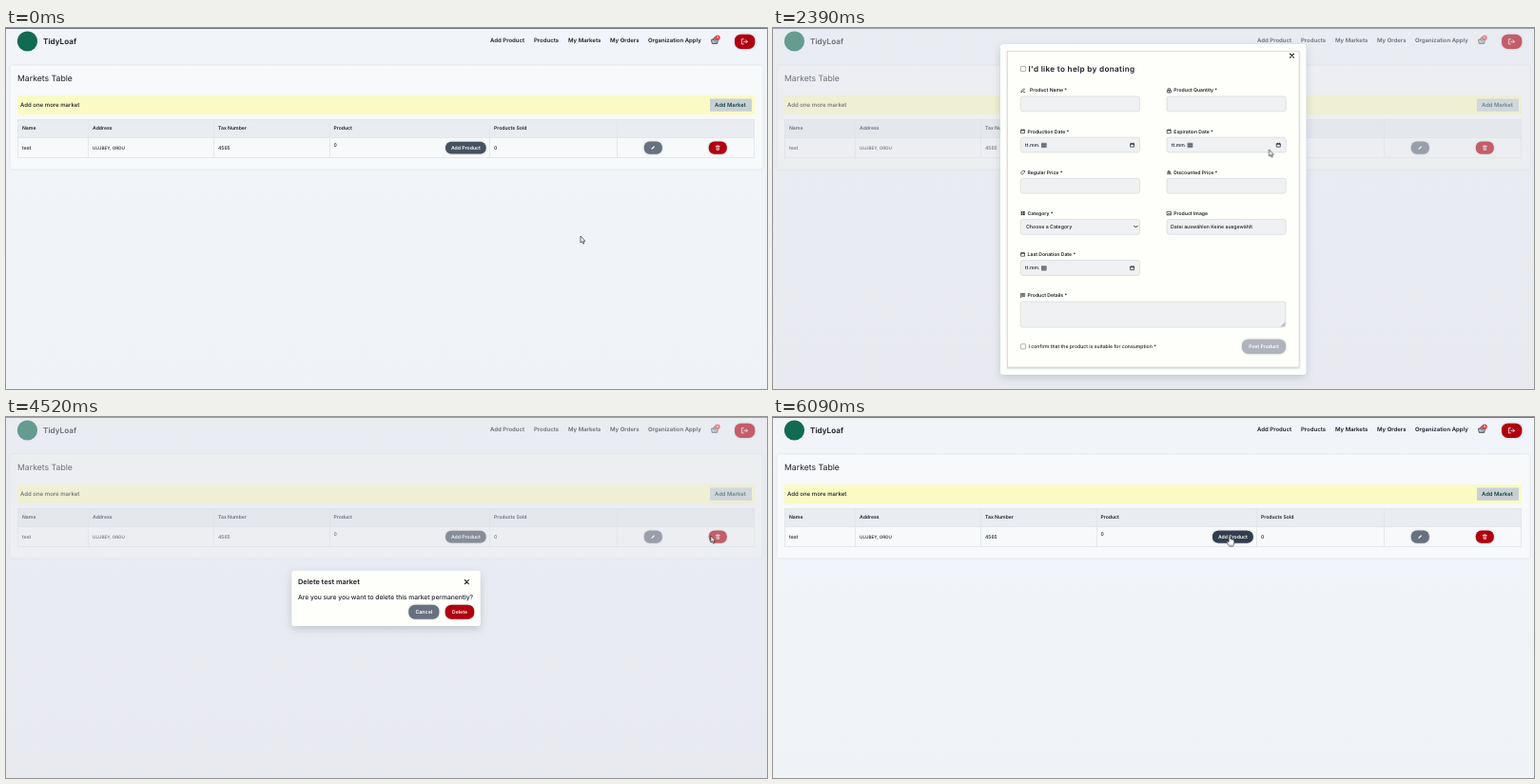
Write an HTML page that moves like this. It is 800 px wide and 380 px high and loops after 6120 ms.

```html
<!DOCTYPE html>
<html lang="en">
<head>
<meta charset="utf-8">
<title>Markets Table</title>
<style>
  html, body { margin: 0; width: 100%; height: 100%; overflow: hidden; background: #f0f3f8; }
  svg { display: block; width: 800px; height: 380px; }
  text { font: 500 5.1px Inter, "Open Sans", sans-serif; fill: #1b1f27; text-rendering: geometricPrecision; white-space: pre; }
  .nav text { font-size: 6px; }
  .bold text, text.bold { font-weight: 600; }
  .white text, text.white { fill: #fff; font-weight: 600; }
  .line { fill: none; stroke-linecap: round; stroke-linejoin: round; }
  .lift { filter: drop-shadow(0 .8px .8px rgba(40, 50, 70, .3)); }
  .panel { transform-box: fill-box; transform-origin: center; }

  #cursor, #arrow, #hand, #addHover, #delHover,
  #formDialog, #formDialog > .panel, #askDialog, #askDialog > .panel {
    animation: 6120ms linear infinite;
  }
  #cursor { animation-name: travel; }
  #arrow, #hand, #addHover, #delHover { animation-timing-function: step-end; }
  #arrow { animation-name: arrow; }
  #hand { animation-name: hand; }
  #addHover { animation-name: addHover; }
  #delHover { animation-name: delHover; }
  #formDialog { animation-name: formFade; }
  #formDialog > .panel { animation-name: formGrow; }
  #askDialog { animation-name: askFade; }
  #askDialog > .panel { animation-name: askShrink; }

  @keyframes travel {
    0%, .49% { transform: translate(604px, 219px); }
    5% { transform: translate(589px, 197px); }
    10.46% { transform: translate(566px, 173px); }
    15.6% { transform: translate(532px, 150px); }
    20.7% { transform: translate(495px, 127px); }
    26.1% { transform: translate(488px, 129px); }
    31.5%, 34.3% { transform: translate(485px, 122px); }
    44.1% { transform: translate(560px, 134px); }
    51.9%, 57.2% { transform: translate(634px, 145px); }
    62.4% { transform: translate(694px, 130px); }
    65.4%, 72.7% { transform: translate(743.5px, 125px); }
    73.86%, 76% { transform: translate(741px, 125px); }
    79.5% { transform: translate(660px, 172px); }
    83.7% { transform: translate(572px, 209px); }
    88.2%, 91.2% { transform: translate(564px, 205px); }
    95.1% { transform: translate(488px, 127px); }
    99.4%, 100% { transform: translate(480px, 124.5px); }
  }
  @keyframes arrow {
    0% { opacity: 1; } 19.8% { opacity: 0; } 33.66% { opacity: 1; }
    64.7% { opacity: 0; } 73.8% { opacity: 1; } 94.6%, 100% { opacity: 0; }
  }
  @keyframes hand {
    0% { opacity: 0; } 19.8% { opacity: 1; } 33.66% { opacity: 0; }
    64.7% { opacity: 1; } 73.8% { opacity: 0; } 94.6%, 100% { opacity: 1; }
  }
  @keyframes addHover {
    0% { opacity: 0; } 19.8% { opacity: 1; } 33.66% { opacity: 0; } 94.6%, 100% { opacity: 1; }
  }
  @keyframes delHover {
    0% { opacity: 0; } 64.7% { opacity: 1; } 73.8%, 100% { opacity: 0; }
  }
  @keyframes formFade {
    0%, 33.66% { opacity: 0; } 37.6%, 55.9% { opacity: 1; } 58.8%, 100% { opacity: 0; }
  }
  @keyframes formGrow {
    0%, 33.66% { transform: scale(.95); } 37.6%, 55.9% { transform: none; } 58.8%, 100% { transform: scale(.95); }
  }
  @keyframes askFade {
    0%, 73.8% { opacity: 0; } 73.85%, 85.3% { opacity: 1; } 88.2%, 100% { opacity: 0; }
  }
  @keyframes askShrink {
    0%, 85.3% { transform: none; } 88.2%, 100% { transform: scale(.95); }
  }
</style>
</head>
<body>
<svg viewBox="0 0 800 380" xmlns="http://www.w3.org/2000/svg">
  <defs>
    <linearGradient id="sky" x2="0" y2="1">
      <stop stop-color="#f1f4f9"/><stop offset="1" stop-color="#eff2f7"/>
    </linearGradient>
    <rect id="backdrop" width="800" height="380" fill="#dee1e7" opacity=".42"/>
    <path id="cross" class="line" d="M-2-2 2 2M2-2-2 2" stroke="#16181d" stroke-width="1.1"/>
    <g id="trash" class="line" stroke="#fff" stroke-width=".55">
      <path d="M-2-1.6H2M-.8-1.6V-2.4H.8V-1.6M-1.5-1.6-1.3 2.4H1.3L1.5-1.6M-.4-.5V1.4M.4-.5V1.4"/>
    </g>
    <g id="i-pen" class="line"><path d="M-1.8 1.8-1.4.5 1-1.9 1.9-1-.5 1.4ZM.6 2H2.2"/></g>
    <g id="i-box" class="line"><path d="M-2 2V0H2V2ZM-1.2 0V-1.9H1.2V0M0 0V2"/></g>
    <g id="i-date" class="line"><path d="M-1.8-1.4H1.8V2H-1.8ZM-1.8-.8H1.8M-1-2V-1.4M1-2V-1.4"/></g>
    <g id="i-tag" class="line"><path d="M-2 .5 .3-1.8 2-1.6 1.8.1-.5 2.2Z"/></g>
    <g id="i-coin" class="line"><path d="M-2 1.8H2M-1.4.6H1.4M0-1.8 1.3-.4H-1.3Z"/></g>
    <g id="i-grid"><path d="M-2-2H-.2V-.2H-2ZM.3-2H2V-.2H.3ZM-2 .3H-.2V2H-2ZM.3.3H2V2H.3Z" fill="#1b1f27" stroke="none"/></g>
    <g id="i-image" class="line"><path d="M-2-1.7H2V1.8H-2ZM-1.7 1.5-.5 0 .3.8 1 .2 1.8 1.4"/></g>
    <g id="i-note" class="line"><path d="M-2-1.8H2V1.2H-.8L-2 2.2ZM-1.1-.8H1.1M-1.1.2H.6"/></g>
  </defs>

  <rect width="800" height="380" fill="url(#sky)"/>
  <rect width="800" height="1" fill="#73767e"/>

  <!-- header -->
  <circle cx="22.5" cy="14" r="10.6" fill="#116b52"/>
  <text class="bold" x="39" y="17.2" style="font-size:8.2px">TidyLoaf</text>
  <g class="nav bold">
    <text x="509" y="15">Add Product</text>
    <text x="555" y="15">Products</text>
    <text x="591" y="15">My Markets</text>
    <text x="635" y="15">My Orders</text>
    <text x="675" y="15">Organization Apply</text>
  </g>
  <path d="M742 12.2H748.4L747.7 16.3H742.7ZM743.3 12 745.2 9.6 747.1 12" class="line" stroke="#2b3038" stroke-width=".9"/>
  <path d="M744 13.4V15.3M745.2 13.4V15.3M746.4 13.4V15.3" class="line" stroke="#2b3038" stroke-width=".5"/>
  <circle cx="748" cy="10.2" r="2.7" fill="#e0404a"/>
  <text class="white" x="748" y="11.4" text-anchor="middle" style="font-size:3.3px">0</text>
  <rect class="lift" x="766" y="6.7" width="21.3" height="15.2" rx="6.5" fill="#b0000f"/>
  <path class="line" d="M775.4 11.7H773.4V16.9H775.4M775.6 14.3H779.4M777.8 12.7 779.4 14.3 777.8 15.9" stroke="#fff" stroke-width=".75"/>

  <!-- markets card -->
  <rect class="lift" x="4.5" y="39.5" width="791" height="109" rx="2" fill="#f7f9fa" style="filter:drop-shadow(0 .6px 1px rgba(60,70,90,.13))"/>
  <text x="12" y="56.2" style="font-size:8.7px;font-weight:400">Markets Table</text>
  <rect x="12" y="71.3" width="775" height="20" rx="1" fill="#fafac4"/>
  <text x="15" y="83" style="font-size:6.05px">Add one more market</text>
  <rect x="740" y="74.5" width="44" height="13.3" fill="#c9d0d5"/>
  <text class="bold" x="745" y="83" style="font-size:5.85px;fill:#14493f">Add Market</text>

  <rect x="12" y="96" width="775" height="19" fill="#e9ecf0"/>
  <path d="M12.5 96V137M86.5 96V137M218.5 96V137M340.5 96V137M508.5 96V137M642.5 96V137M786.5 96V137M12 96.5H787M12 115.5H787M12 136.5H787" stroke="#e3e6ea" fill="none" stroke-width=".9"/>
  <g class="bold">
    <text x="17" y="107.4">Name</text>
    <text x="91" y="107.4">Address</text>
    <text x="223" y="107.4">Tax Number</text>
    <text x="344.5" y="107.4">Product</text>
    <text x="513" y="107.4">Products Sold</text>
  </g>
  <text x="17" y="127.8">test</text>
  <text x="91" y="127.8" style="font-size:4.6px">ULUBEY, ORDU</text>
  <text x="223" y="127.8">4565</text>
  <text x="344.5" y="125">0</text>
  <text x="513" y="127.8">0</text>

  <rect class="lift" x="462" y="119.8" width="42.7" height="12.7" rx="6" fill="#46515f"/>
  <rect id="addHover" x="462" y="119.8" width="42.7" height="12.7" rx="6" fill="#323d4e" opacity="0"/>
  <text class="white" x="483.4" y="128" text-anchor="middle" style="font-size:5.15px">Add Product</text>
  <rect class="lift" x="670.8" y="119.5" width="19" height="13.3" rx="5.8" fill="#68717e"/>
  <path d="M678.4 128 678.8 126.6 681.2 124.2 682.1 125.1 679.7 127.5Z" fill="#fff"/>
  <rect class="lift" x="738.8" y="119.5" width="19" height="13.3" rx="5.8" fill="#b0000f"/>
  <rect id="delHover" x="738.8" y="119.5" width="19" height="13.3" rx="5.8" fill="#8d0613" opacity="0"/>
  <use href="#trash" x="748.3" y="126.1"/>

  <!-- new product dialog -->
  <g id="formDialog" opacity="0">
    <use href="#backdrop"/>
    <g class="panel">
      <rect x="239" y="17" width="321.5" height="348" rx="3" fill="#fefffc" style="filter:drop-shadow(0 3px 4px rgba(50,60,80,.2))"/>
      <rect x="246.5" y="24.5" width="306.5" height="332.5" fill="#fefffa" stroke="#d2d5d9" stroke-width=".7" style="filter:drop-shadow(0 1px 1.2px rgba(50,60,80,.25))"/>
      <use href="#cross" x="545.5" y="29.2"/>
      <g fill="#fff" stroke="#777b82" stroke-width=".6">
        <rect x="260.4" y="40.4" width="5.2" height="5.2" rx=".8"/>
        <rect x="260.4" y="332.7" width="5.2" height="5.2" rx=".8"/>
      </g>
      <text class="bold" x="268.5" y="45.8" style="font-size:8.2px;letter-spacing:.3px" id="donate">I'd like to help by donating</text>
      <g id="fields"></g>
      <path class="line" d="M534.5 314 538 310.5M536.5 314 538 312.5" stroke="#50545c" stroke-width=".6"/>
      <path class="line" d="M379.6 208.2 381.4 210 383.2 208.2" stroke="#1b1f27" stroke-width=".9"/>
      <text x="266" y="211" style="font-size:5.25px">Choose a Category</text>
      <text x="418" y="211" style="font-size:5.2px">Datei auswählen Keine ausgewählt</text>
      <text x="268.5" y="337.2" style="font-size:5.15px">I confirm that the product is suitable for consumption *</text>
      <rect class="lift" x="493" y="327.7" width="46" height="15.3" rx="6.5" fill="#afb4bc"/>
      <text class="white" x="516" y="337.2" text-anchor="middle">Post Product</text>
    </g>
  </g>

  <!-- delete dialog -->
  <g id="askDialog" opacity="0">
    <use href="#backdrop"/>
    <g class="panel">
      <rect x="300.3" y="161.7" width="198.4" height="58.3" rx="2.5" fill="#fefffb" style="filter:drop-shadow(0 3px 4px rgba(50,60,80,.22))"/>
      <text class="bold" x="307" y="176" style="font-size:7.35px">Delete test market</text>
      <use href="#cross" x="484.3" y="173.6"/>
      <text x="307" y="192.4" style="font-size:6.7px">Are you sure you want to delete this market permanently?</text>
      <rect class="lift" x="423.3" y="197.7" width="32" height="15" rx="6.5" fill="#68717e"/>
      <text class="white" x="439.3" y="207.1" text-anchor="middle" style="font-size:5.3px">Cancel</text>
      <rect class="lift" x="461.7" y="197.7" width="30.5" height="15" rx="6.5" fill="#b0000f"/>
      <text class="white" x="477" y="207.1" text-anchor="middle">Delete</text>
    </g>
  </g>

  <g id="cursor">
    <path id="arrow" d="M0 0V7.1L1.6 5.7 2.7 8.2 3.8 7.7 2.8 5.3H4.8Z" fill="#fff" stroke="#25282e" stroke-width=".7" stroke-linejoin="round"/>
    <path id="hand" opacity="0" d="M-.9.6Q0-.7.9.6V4Q2 3.4 2.4 4.4 3.4 3.9 3.8 4.9 4.9 4.7 4.9 5.8V7.8Q4.7 9.6 3.8 11H-.6L-3 7.6Q-3.4 6.3-2.1 6.3L-.9 7.3Z" fill="#fff" stroke="#25282e" stroke-width=".7" stroke-linejoin="round"/>
  </g>
</svg>

<script>
  const left = 260, right = 413.7, top0 = 72, pitch = 43.15;
  const box = (x, y, w, h) =>
    `<rect x="${x + .3}" y="${y}" width="${w}" height="${h}" rx="2.4" fill="#eff1f3" stroke="#d3d7dc" stroke-width=".7"/>`;

  const label = (x, y, icon, text, indent) =>
    `<use href="#i-${icon}" x="${x + 2.7}" y="${y - 6.4}" stroke="#1b1f27" stroke-width=".65"/>
     <text class="bold" x="${x + indent}" y="${y - 4.6}">${text}</text>`;

  const dateHint = (x, y) =>
    `<text x="${x + 5}" y="${y + 9.8}">tt.mm.</text>
     <rect x="${x + 22}" y="${y + 5.6}" width="5.6" height="5.4" fill="#8b8f96"/>
     <path d="M${x + 22} ${y + 7.2}h5.6m-5.6 2h5.6" stroke="#3c4048" stroke-width=".6"/>
     <use href="#i-date" x="${x + 117.8}" y="${y + 8}" stroke="#1b1f27" stroke-width=".7"/>`;

  const rows = [
    [["pen", "Product Name *", 10], ["box", "Product Quantity *"]],
    [["date", "Production Date *"], ["date", "Expiration Date *"]],
    [["tag", "Regular Price *"], ["coin", "Discounted Price *"]],
    [["grid", "Category *"], ["image", "Product Image"]],
    [["date", "Last Donation Date *"]]
  ];

  let markup = "";
  rows.forEach((row, r) => row.forEach(([icon, text, indent = 7.6], c) => {
    const x = c ? right : left, y = top0 + r * pitch;
    markup += label(x, y, icon, text, indent) + box(x, y, 125.2, 15.8);
    if (icon === "date") markup += dateHint(x, y);
  }));
  const last = top0 + 5 * pitch;
  markup += label(left, last, "note", "Product Details *", 7.6) + box(left, last + .3, 278.6, 27);
  document.getElementById("fields").innerHTML = markup;
</script>
</body>
</html>
```
